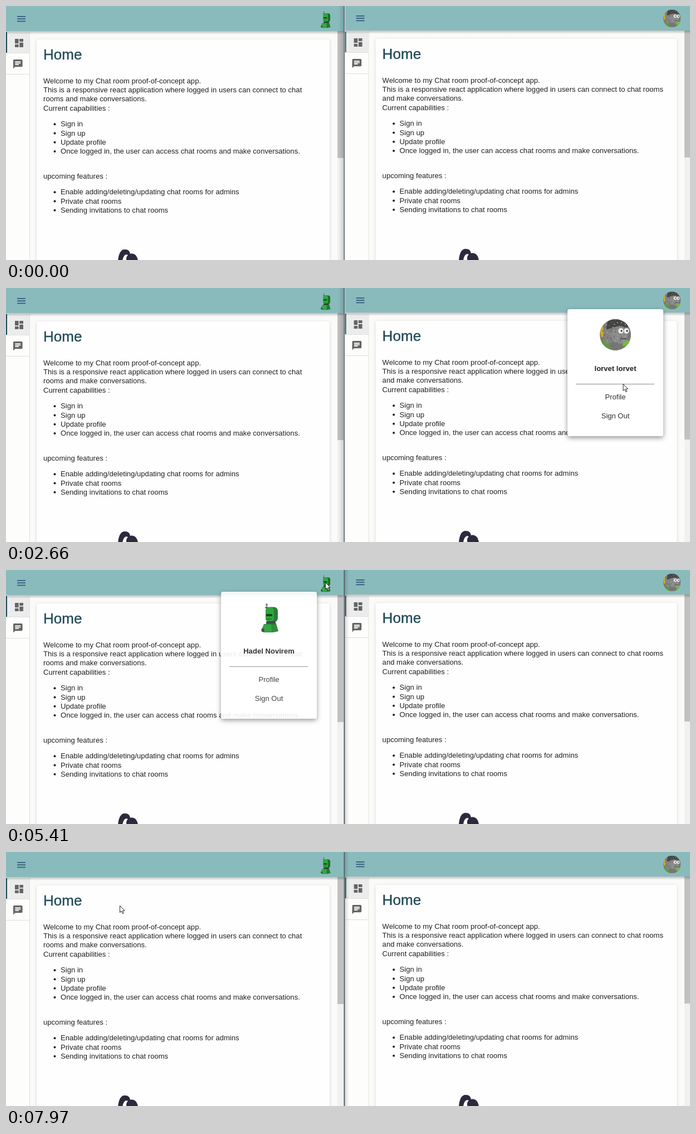
Write an HTML page with a canvas that moves like this. It is 1228 px wide and 456 px high and loops after 8000 ms.

```html
<!DOCTYPE html>
<html lang="en">
<head>
<meta charset="utf-8">
<title>Chat room demo</title>
<style>
html, body { margin: 0; width: 100%; height: 100%; overflow: hidden; background: #fafaf8; }
canvas { display: block; width: 100vw; height: 100vh; }
</style>
</head>
<body>
<canvas id="stage" width="1228" height="456"></canvas>
<script>
const ctx = document.getElementById('stage').getContext('2d');
const LOOP = 8000, W = 1228, H = 456, SEAM = 607, LINE = 16.2;
const MENU = { w: 172, h: 228, time: 290 };
const FONT = '"Liberation Sans", Arial, sans-serif';
const TEAL = '#89bbbd', INK = '#1f1f1f', ICON = '#646464', NAVY = '#234b5a';

const clamp = v => Math.max(0, Math.min(1, v));
const ramp = (t, from, to) => clamp((t - from) / (to - from));
const pulse = (t, on, off, fade) => ramp(t, on, on + fade) * (1 - ramp(t, off, off + fade));
const smooth = k => k * k * (3 - 2 * k);

// cubic-bezier(.4, 0, .2, 1), solved by bisection
function ease(x) {
  let lo = 0, hi = 1;
  for (let i = 0; i < 18; i++) {
    const s = (lo + hi) / 2, r = 1 - s;
    if (1.2 * r * r * s + 0.6 * r * s * s + s ** 3 < x) lo = s; else hi = s;
  }
  return 3 * (1 - lo) * lo * lo + lo ** 3;
}

function box(x, y, w, h, color, r = 0) {
  ctx.fillStyle = color;
  ctx.beginPath();
  ctx.roundRect(x, y, w, h, r);
  ctx.fill();
}

function oval(x, y, rx, ry, color) {
  ctx.fillStyle = color;
  ctx.beginPath();
  ctx.ellipse(x, y, rx, ry, 0, 0, 7);
  ctx.fill();
}

function fillPath(d, color) {
  ctx.fillStyle = color;
  ctx.fill(new Path2D(d));
}

function label(str, x, y, { size = 13, weight = 400, color = INK, align = 'left', gap = 0.05 } = {}) {
  ctx.font = `${weight} ${size}px ${FONT}`;
  ctx.letterSpacing = gap + 'px';
  ctx.textAlign = align;
  ctx.fillStyle = color;
  ctx.fillText(str, x, y);
}

function fade(x0, y0, x1, y1, alpha) {
  const g = ctx.createLinearGradient(x0, y0, x1, y1);
  g.addColorStop(0, `rgba(0,0,0,${alpha})`);
  g.addColorStop(1, 'rgba(0,0,0,0)');
  return g;
}

function at(x, y, scale, draw) {
  ctx.save();
  ctx.translate(x, y);
  ctx.scale(scale, scale);
  draw();
  ctx.restore();
}

function dashIcon() {
  [10, 6].forEach((cut, col) => {
    box(col * 10, 0, 8, cut, ICON);
    box(col * 10, cut + 2, 8, 16 - cut, ICON);
  });
}

function chatIcon() {
  box(0, 0, 20, 16, ICON, 2);
  fillPath('M0 10V20L6 14Z', ICON);
  for (let i = 0; i < 3; i++) box(4, 4 + i * 3, i < 2 ? 12 : 8, 2, '#fff');
}

// green robot, about 31 by 52
function robot() {
  box(9.3, 2, 1.6, 9, '#777');
  oval(10, 2.2, 1.8, 2.2, '#777');
  oval(10, 7.5, 3, 1.5, '#555');
  box(8, 6.5, 22, 27, '#176d25', 7);
  box(8, 7, 15, 26, '#2fa83d', 6);
  box(9, 19, 11, 4, '#123d1a', 1);
  box(9, 27, 10, 2, '#1c7a2b', 1);
  box(9, 32, 17, 6, '#343b36', 2);
  fillPath('M5 37L27 36 31 50 22 52H4L1 47Z', '#1d7f2c');
  fillPath('M5 38L18 37 19 51H4L2 46Z', '#36a945');
  oval(3, 48, 2.6, 3.2, '#444');
}

// speckled grey creature in a circle of radius 28
function creature() {
  ctx.beginPath();
  ctx.arc(0, 0, 28, 0, 7);
  ctx.clip();
  box(-28, -28, 56, 56, '#777973');
  box(-28, 10, 56, 18, '#5d9a37');
  oval(20, 15, 14, 5, '#79b843');
  oval(-24, -6, 3, 11, '#d0ab26');
  oval(-14, 2, 7, 16, '#828282');
  box(-9, 4, 22, 26, '#767676', 5);
  oval(7, 0, 15, 16, '#8b8b8b');
  fillPath('M-17 -9L-13 -28H19L23 -13 6 -16Z', '#434543');
  for (let i = 0; i < 40; i++) {
    const a = i * 2.4, r = Math.sqrt(i) * 3.6;
    oval(r * Math.cos(a), r * Math.sin(a) - 5, 1.3, 1, i % 2 ? '#a0a0a0' : '#626262');
  }
  [10, 20].forEach(x => {
    oval(x, -7, 4.6, 5, '#eee');
    oval(x + 1, -7, 1.4, 1.8, '#222');
  });
  box(8, 6, 12, 2, '#555', 1);
}

function lines(items, x, y, bullet) {
  items.forEach((s, i) => {
    if (bullet) oval(x - 10.5, y - 4 + i * LINE, 2, 2, INK);
    label(s, x, y + i * LINE);
  });
}

function page(x, y, { right, card, scroll, puff, intro }) {
  const w = right - x;
  ctx.save();
  ctx.beginPath();
  ctx.rect(x, 0, w, H);
  ctx.clip();
  ctx.translate(x, y);

  box(0, 0, w, H + 2, '#fafaf8');
  box(0, 46, 42, H, '#fdfdfc');
  box(0, 47, 42, 37, '#ececec');
  box(0, 47, 2, 37, NAVY);
  box(0, 84, 42, 1, '#e0e0e0');
  box(0, 122, 42, 1, '#dedede');
  box(42, 46, 1, H, '#e2e2e2');
  at(16, 59, 0.83, dashIcon);
  at(13, 96, 0.83, chatIcon);

  ctx.save();
  ctx.shadowColor = 'rgba(0,0,0,.16)';
  ctx.shadowBlur = 4;
  ctx.shadowOffsetY = 1;
  box(55, 60, card, H, '#fefefe', 4);
  ctx.restore();

  label('Home', 67, 96, { size: 26, color: NAVY });
  ctx.strokeStyle = NAVY;
  ctx.lineWidth = 0.4;
  ctx.strokeText('Home', 67, 96);

  lines(['Welcome to my Chat room proof-of-concept app.', ...intro, 'Current capabilities :'], 67, 139);
  lines(['Sign in', 'Sign up', 'Update profile',
    'Once logged in, the user can access chat rooms and make conversations.'], 98, 216.3, true);
  label('upcoming features :', 67, 309.5);
  lines(['Enable adding/deleting/updating chat rooms for admins', 'Private chat rooms',
    'Sending invitations to chat rooms'], 98, 338.3, true);

  at(puff, 0, 1, () => {
    fillPath('M201 458C202 445 206 437 213 437S222 440 223 445C229 443 236 447 237 458H217C215 454 216 450 219 447 213 444 210 451 209 458Z', '#2c2a3d');
  });

  box(scroll, 45, 12, H, '#f1f1f1');
  box(scroll, 45, 11, 228, '#c1c1c1');

  box(0, -1, w, 46, TEAL);
  box(0, 45, w, 6, fade(0, 45, 0, 51, 0.24));
  for (let i = 0; i < 3; i++) box(20, 18 + i * 4.3, 15, 1.7, '#2f5878');
  ctx.restore();
}

// shadow only outside the card, so a half faded card stays clean
function cardShadow() {
  const { w, h } = MENU;
  ctx.save();
  ctx.beginPath();
  ctx.rect(-30, -30, w + 60, h + 60);
  ctx.roundRect(0, 0, w, h, 4);
  ctx.clip('evenodd');
  ctx.shadowColor = 'rgba(0,0,0,.42)';
  ctx.shadowBlur = 9;
  ctx.shadowOffsetY = 3;
  box(0, 0, w, h, '#fff', 4);
  ctx.restore();
}

// scale and opacity run at different speeds
function menuState(t, open, close) {
  const D = MENU.time;
  return t < close
    ? { grow: ease(ramp(t, open, open + D * 0.666)), alpha: ease(ramp(t, open, open + D)) }
    : { grow: 1 - ease(ramp(t, close + D / 3, close + D)), alpha: 1 - ease(ramp(t, close, close + D)) };
}

function menu(x, y, name, avatar, { grow, alpha }, hover) {
  if (alpha <= 0) return;
  const s = 0.75 + 0.25 * grow, mid = MENU.w / 2;
  ctx.save();
  ctx.globalAlpha = alpha;
  ctx.translate(x + MENU.w, y);
  ctx.scale(s, s * s);
  ctx.translate(-MENU.w, 0);
  cardShadow();
  box(0, 0, MENU.w, MENU.h, '#fff', 4);
  avatar();
  label(name, mid, 111, { weight: 700, align: 'center' });
  box(15, 134, 141, 1, '#8b8b8b');
  box(15, 142, 141, 34, `rgba(238,239,240,${hover})`, 3);
  const on = hover > 0.5;
  label('Profile', mid, 162.3, { align: 'center', weight: on ? 700 : 400, color: on ? '#8a8a8a' : '#303030', gap: 0 });
  label('Sign Out', mid, 196.3, { align: 'center', color: '#303030', gap: 0 });
  ctx.restore();
}

function tooltip(alpha) {
  ctx.save();
  ctx.globalAlpha = alpha;
  box(1081, 11, 88, 23, '#676c6d', 4);
  label('lorvet lorvet', 1125, 26.5, { weight: 700, color: '#fff', align: 'center' });
  ctx.restore();
}

const ENTER = 230;
const GLIDES = [
  { from: ENTER, to: 990, x: 1196, y: 60 },
  { from: 1110, to: 1470, x: 1199, y: 27 },
  { from: 2130, to: 2800, x: 1096, y: 190 },
  { from: 2920, to: 3090, x: 1093, y: 154 },
  { from: 3670, to: 4030, x: 981, y: 69 },
  { from: 4240, to: 4930, x: 573, y: 22 },
  { from: 5440, to: 5870, x: 473, y: 156 },
  { from: 6360, to: 6500, x: 475, y: 183 },
  { from: 6780, to: 7130, x: 320, y: 68 },
  { from: 7330, to: 7930, x: 204, y: 96 }
];

function pointer(t, hand) {
  if (t < ENTER) return;
  let x = 1098, y = 432;
  for (const g of GLIDES) {
    const k = smooth(ramp(t, g.from, g.to));
    x += (g.x - x) * k;
    y += (g.y - y) * k;
  }
  const path = new Path2D(hand
    ? 'M3 1.5C3 -.2 5 -.2 5 1.5V6L10 7Q11 7 11 8V11L10 16H4.5L.5 9.5C0 8 1.5 7.6 3 9.5Z'
    : 'M.5 .5V12.6L3.3 10 5.3 14.6 7.3 13.7 5.3 9.3H9.2Z');
  at(x, y, 1, () => {
    ctx.fillStyle = '#fff';
    ctx.strokeStyle = '#222';
    ctx.lineWidth = 1;
    ctx.lineJoin = 'round';
    ctx.fill(path);
    ctx.stroke(path);
  });
}

// the active window drops its shadow on the other one
function seam(leftActive) {
  const edge = leftActive ? SEAM + 1 : SEAM, reach = leftActive ? 8 : -10;
  box(Math.min(edge, edge + reach), 0, Math.abs(reach), H, fade(edge, 0, edge + reach, 0, 0.15));
  box(SEAM - 0.5, 0, 1.3, H, '#4d5d66');
}

const INTRO = 'This is a responsive react application where logged in users can connect to chat';
const LEFT = {
  right: SEAM, card: 526, scroll: 595, puff: 0,
  intro: [INTRO, 'rooms and make conversations.']
};
const RIGHT = {
  right: W, card: 541, scroll: 609.4, puff: 3.3,
  intro: [INTRO + ' rooms', 'and make conversations.']
};

function draw(t) {
  page(0, 0, LEFT);
  page(608.6, -1, RIGHT);
  at(565, 9.5, 0.57, robot);
  at(1195.7, 22.3, 0.56, creature);
  seam(t > 5190);

  const hoverR = pulse(t, 2690, 2960, 90);
  const hoverL = pulse(t, 6440, 6820, 90);
  tooltip(pulse(t, 1620, 2150, 100));
  menu(1008, 38, 'lorvet lorvet', () => at(86, 46, 1, creature), menuState(t, 1963, 4175), hoverR);
  menu(386, 39, 'Hadel Novirem', () => at(72, 21, 1, robot), menuState(t, 5225, 7330), hoverL);
  pointer(t, Math.max(hoverR, hoverL) > 0.4);
}

function tick() {
  draw(performance.now() % LOOP);
  requestAnimationFrame(tick);
}
tick();
</script>
</body>
</html>
```
